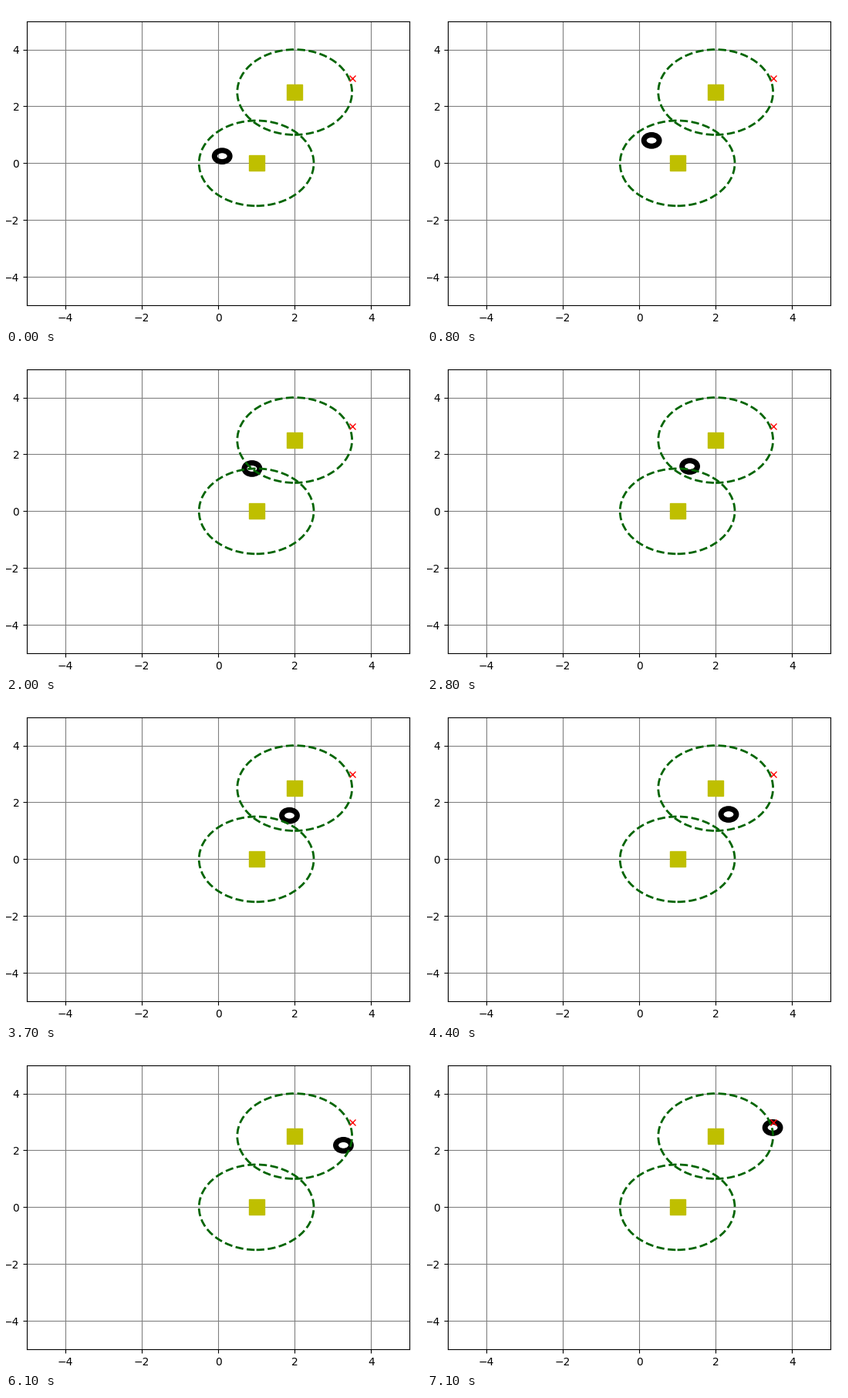
Write a matplotlib script that moves like this. It is 538x416 px and loops after 7200 ms.

```python
import numpy as np
import matplotlib.pyplot as plt
from matplotlib.animation import FuncAnimation
from matplotlib.patches import Circle

W, H, DPI = 538, 416, 100
FRAMES, STEP = 72, 100

OBSTACLES = [(1, 0), (2, 2.5)]
GOAL = (3.5, 3)

# Waypoints of the robot: time in seconds, x, y
WAY = np.array([
    (0.0, 0.105, 0.25), (0.8, 0.325, 0.80), (2.0, 0.885, 1.50),
    (3.7, 1.865, 1.535), (5.1, 2.79, 1.71), (6.1, 3.275, 2.18),
    (6.4, 3.35, 2.36), (7.1, 3.49, 2.80),
])
TIMES, POINTS = WAY[:, 0], WAY[:, 1:]
SPEEDS = np.gradient(POINTS, TIMES, axis=0, edge_order=2)


def position(t):
    """Cubic Hermite interpolation along the waypoints."""
    i = min(max(np.searchsorted(TIMES, t, side="right") - 1, 0), len(TIMES) - 2)
    h = TIMES[i + 1] - TIMES[i]
    u = (t - TIMES[i]) / h
    return ((1 + 2 * u) * (1 - u) ** 2 * POINTS[i]
            + u * (1 - u) ** 2 * h * SPEEDS[i]
            + u * u * (3 - 2 * u) * POINTS[i + 1]
            + u * u * (u - 1) * h * SPEEDS[i + 1])


fig = plt.figure(figsize=(W / DPI, H / DPI), dpi=DPI, facecolor="white")
ax = fig.add_axes([27 / W, 26.8 / H, 496 / W, 369.6 / H])
ax.set(xlim=(-5, 5), ylim=(-5, 5),
       xticks=range(-4, 5, 2), yticks=range(-4, 5, 2))
ax.set_axisbelow(True)
ax.grid(True, color="gray", linewidth=0.8)

for x, y in OBSTACLES:
    ax.add_patch(Circle((x, y), 1.5, fill=False, edgecolor="darkgreen",
                        linestyle="--", linewidth=2, zorder=2))
    ax.plot(x, y, "ys", markersize=14, zorder=3)
ax.plot(*GOAL, "rx", markersize=6, zorder=3)

robot = ax.add_patch(Circle(POINTS[0], 0.2, fill=False, edgecolor="black",
                            linewidth=5, zorder=1))


def draw(frame):
    robot.center = tuple(position(frame * STEP / 1000))
    return [robot]


anim = FuncAnimation(fig, draw, frames=FRAMES, interval=STEP,
                     repeat=True, repeat_delay=0, blit=False)
plt.show()
```
